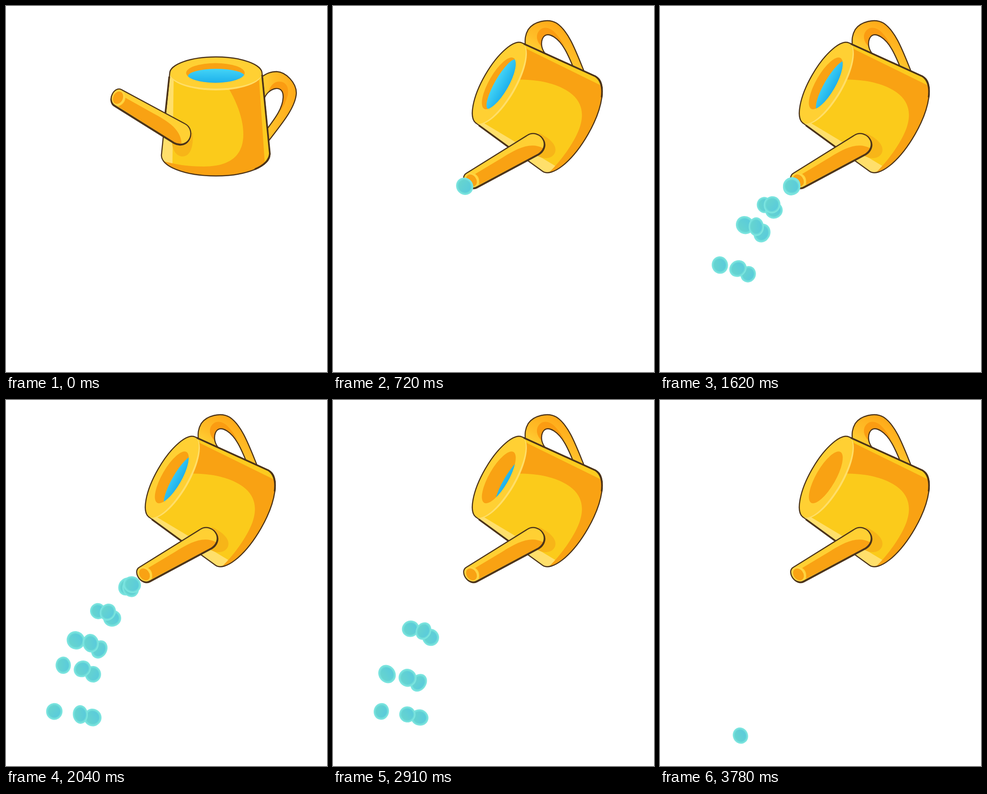
An HTML page for the animation above (3.81 s loop, 702 by 798 pixels).

```html
<!DOCTYPE html>
<html lang="en">
<head>
<meta charset="utf-8">
<title>Watering can</title>
<style>
html, body { margin: 0; width: 100%; height: 100%; overflow: hidden; background: #fff; }
svg { display: block; width: 100vw; height: 100vh; }
.line { fill: none; stroke: #4b3319; stroke-width: 2.4px; }
.bold { stroke-width: 3.6px; }
</style>
</head>
<body>
<svg viewBox="0 0 702 798">
  <defs>
    <linearGradient id="water" gradientUnits="userSpaceOnUse" x1="0" y1="136" x2="0" y2="166">
      <stop offset="0" stop-color="#45d5f6"/><stop offset="1" stop-color="#1fb2ec"/>
    </linearGradient>
    <linearGradient id="grip">
      <stop offset="0" stop-color="#ffd236"/><stop offset=".35" stop-color="#ffbe28"/><stop offset="1" stop-color="#ffa918"/>
    </linearGradient>
    <linearGradient id="aqua">
      <stop offset="0" stop-color="#66d4cf"/><stop offset="1" stop-color="#5acbdb"/>
    </linearGradient>
    <path id="handle" d="M556 157C570 146 580 143 592 143C612 144 635 167 635 190C633 222 603 257 572 297L571 268C590 243 605 222 606 200C607 185 600 179 590 180C577 182 568 192 564 204Z"/>
    <path id="body" d="M358 147A101 36 0 0 1 560 147L577 322C580 349 526 370.500 459 370.500C390 370.500 337 349 340 324Z"/>
    <path id="tube" d="M252 182L390 256C405 263 408 281 399 293C392 302 379 304 368 298L238 217C229 212 228 200 233 191C238 182 246 179 252 182Z"/>
    <path id="blob" d="M-1 0C-1 -.62 -.5 -1 0 -1C.56 -1 1 -.5 1 0C1 .56 .6 1 0 1C-.56 1 -1 .5 -1 0Z"/>
    <clipPath id="inside"><use href="#body"/></clipPath>
    <clipPath id="hole"><ellipse cx="458" cy="146" rx="64" ry="21.500"/></clipPath>
    <g id="drop">
      <use href="#blob" fill="#7be4df"/>
      <use href="#blob" fill="#6ddad8" transform="scale(.84)"/>
      <use href="#blob" fill="url(#aqua)" transform="scale(.73)"/>
    </g>
  </defs>

  <g id="can" stroke-linejoin="round">
    <use href="#handle" fill="url(#grip)"/>
    <path d="M594 165C611 163 620 176 616 195Q611 214 598 232Q606 215 606 200C607 185 600 179 590 180Q580 181 574 188C577 176 584 167 594 165Z" fill="#fb9c12"/>
    <use href="#handle" class="line"/>

    <use href="#body" fill="#fbcb1b"/>
    <g clip-path="url(#inside)">
      <path d="M350 140H367L364 344L330 340Z" fill="#ffdf6b"/>
      <path d="M486 178C505 210 519 246 519 280C519 330 485 350 433 350C400 350 370 346 340 337V380H590V140H486Z" fill="#f9a213"/>
      <path d="M552 140L566 344H590V140Z" fill="#fccb1f"/>
    </g>
    <ellipse cx="459" cy="147.500" rx="101" ry="36.500" fill="#ffde68"/>
    <ellipse cx="459" cy="145.500" rx="101" ry="34.500" fill="#ffd033"/>
    <use href="#body" class="line"/>
    <path d="M560 150L577 322Q575 343 544 356M357 154L348 238" class="line bold"/>
    <ellipse cx="458" cy="146" rx="64" ry="21.500" fill="#f9a213"/>
    <g clip-path="url(#hole)"><ellipse id="pool" cx="460" cy="153" rx="62" ry="16" fill="url(#water)"/></g>

    <path d="M363 296C364 318 375 328 386 328C402 328 411 308 408 276Z" fill="#f7b518"/>
    <use href="#tube" class="line" transform="translate(-.5 1.800)"/>
    <use href="#tube" fill="#ffd033"/>
    <path d="M261 200L322 234C356 252 383 270 384 301Q375 301 368 297L245 219C256 215 261 208 261 200Z" fill="#f9a213"/>
    <g transform="rotate(24 245 200)">
      <ellipse cx="245" cy="200" rx="14.500" ry="18" fill="#ffd442"/>
      <ellipse cx="245" cy="200" rx="10.500" ry="14" fill="#f9a213"/>
    </g>
    <use href="#tube" class="line"/>
  </g>
  <g id="rain"></g>
</svg>
<script>
const LOOP = 3810, STEP = 30;
const SVG = 'http://www.w3.org/2000/svg';
const $ = id => document.getElementById(id);
const can = $('can'), pool = $('pool'), rain = $('rain');

function make(tag, attrs) {
  const el = document.createElementNS(SVG, tag);
  for (const k in attrs) el.setAttribute(k, attrs[k]);
  return el;
}

// Each burst sends one drop down every lane at constant speed.
const bursts = [715, 1083, 1300, 1585, 1880, 2278];
const lanes = [
  { curve: '190 440 75 600 113 722', delay: 61, life: 1420 },
  { curve: '230 455 158 610 196 716', delay: 66, life: 1355 },
  { curve: '212 448 122 604 176 732', delay: 103, life: 1400 }
].map(lane => {
  const path = make('path', { d: 'M288 393C' + lane.curve });
  return { ...lane, path, length: path.getTotalLength() };
});

const drops = bursts.flatMap((born, b) => lanes.map((lane, l) => {
  const el = rain.appendChild(make('use', { href: '#drop' }));
  return { el, born, lane, seed: b * 2.3 + l * 4.1 };
}));

function ease(u) {
  return u < 0.5 ? 4 * u ** 3 : 1 - 4 * (1 - u) ** 3;
}

function placeDrop({ el, born, lane, seed }, t) {
  const u = (t - born - lane.delay) / lane.life;
  const on = t >= born && u <= 1;
  el.setAttribute('visibility', on ? 'visible' : 'hidden');
  if (!on) return;
  const { x, y } = lane.path.getPointAtLength(lane.length * Math.max(0, u));
  const w = 18 + 1.6 * Math.sin(t / 130 + seed);
  const h = 19.2 + 1.6 * Math.sin(t / 170 + seed * 1.7);
  const turn = 40 * Math.sin(t / 260 + seed * 2.1);
  el.setAttribute('transform', `translate(${x} ${y}) rotate(${turn}) scale(${w} ${h})`);
}

function draw(t) {
  can.setAttribute('transform', `rotate(${-60 * ease(Math.min(t / 600, 1))} 430 240)`);
  pool.setAttribute('cy', 153 + Math.max(0, t - 1090) * 0.0115);
  drops.forEach(d => placeDrop(d, t));
}

const start = performance.now();
function tick() {
  const t = (performance.now() - start) % LOOP;
  draw(Math.floor(t / STEP) * STEP);
  requestAnimationFrame(tick);
}
tick();
</script>
</body>
</html>
```
